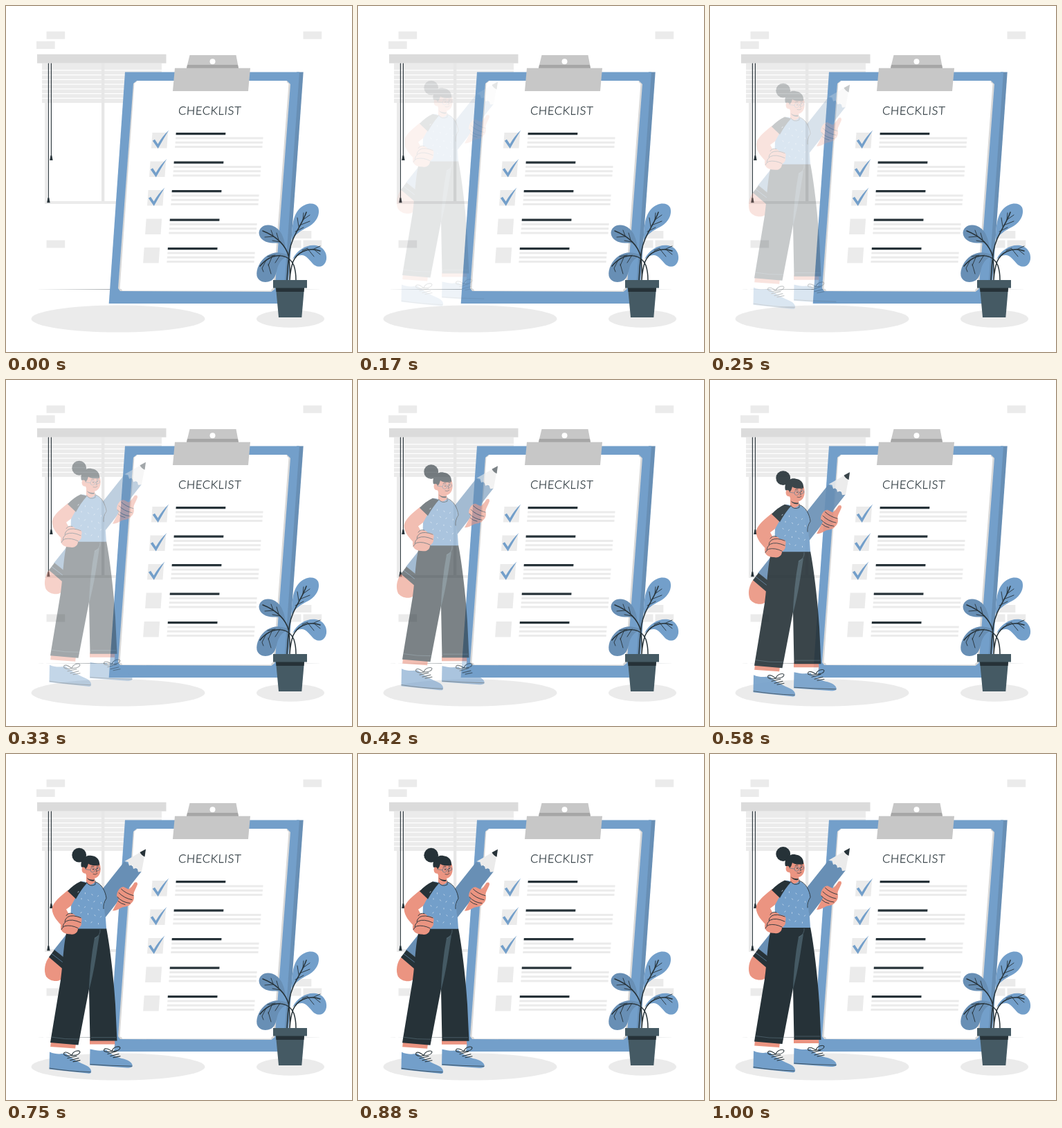
Write an HTML page that moves like this. It is 500x500 px and loops after 1.04 s.

```html
<!DOCTYPE html>
<html lang="en">
<head>
<meta charset="utf-8">
<title>Checklist</title>
<style>
html, body { margin: 0; width: 100%; height: 100%; overflow: hidden; background: #fff; }
svg { display: block; width: 100vw; height: 100vh; }
.blue { fill: #739fca; }
.shade { fill: #688fb5; }
.dark { fill: #263238; }
.slate { fill: #455a64; }
.pale { fill: #ebebeb; }
.grey { fill: #c7c7c7; }
.skin { fill: #eb9481; }
.white { fill: #fff; }
.line { fill: none; stroke: #263238; stroke-width: .9; stroke-linecap: round; stroke-linejoin: round; }
.thin { fill: none; stroke: #5d7580; stroke-width: .6; }
text { font: normal 300 16.4px Lato, "Open Sans", sans-serif; letter-spacing: .7px; fill: #263238; stroke: #263238; stroke-width: .25; }
</style>
</head>
<body>
<svg viewBox="0 0 500 500">
  <!-- wall -->
  <path class="pale" d="M58.5 36.700h26.700v11H58.500zM44 50.900h26.700v11H44zM429.500 36.700h26.700v11h-26.700zM58.500 338.500h26.700v11H58.500zM415 325h26.300v11H415zM400 338.500h26.500v11H400zM429.500 338.500h26.700v11h-26.700z"/>

  <!-- window -->
  <path class="pale" d="M56 83h4v199h165v4H56z"/>
  <path class="pale" d="M52 83h173v57H52z"/>
  <g id="slats"></g>
  <path fill="#e7e7e7" d="M138 83h4.300v199H138z"/>
  <path fill="#dbdbdb" d="M45 69.700h186.500v13H45z"/>
  <path class="line" style="stroke-width:1.100" d="M61.400 83V279M65.400 83V218"/>
  <path class="dark" d="M60.500 277h1.800l1.300 7.200h-4.400zM64.500 216h1.800l1.300 7h-4.400z"/>

  <!-- floor -->
  <path class="dark" d="M41 409.600L250 409.200 460 409.600 250 410z"/>
  <ellipse class="pale" cx="162" cy="452" rx="125.500" ry="19.500"/>
  <ellipse class="pale" cx="411" cy="452" rx="49" ry="12.700"/>

  <!-- clipboard -->
  <path class="shade" d="M420 95.500h9.700L406 430h-9z"/>
  <path class="blue" d="M172 95.500H424L400.500 430H148.700z"/>
  <path fill="#d9d9d9" d="M184 112l5-4H406l5 5L388.500 409l-5 4-218.500-1-3-4z"/>
  <path class="white" d="M185.500 111.500q3-.5 4-3.500H405.500q0 3 3 4L386 408q-3 1-3 3.500H168q0-2.500-3.500-3z"/>
  <path class="grey" d="M265.500 71H332.500L336 89.500H261z"/>
  <path fill="#a6a6a6" d="M262 85H335l1 5H261z"/>
  <circle class="white" cx="298.500" cy="80.300" r="4"/>
  <path class="grey" d="M244 89.700H353L350 123H241z"/>
  <text x="294.300" y="157.300" text-anchor="middle" transform="translate(11) skewX(-4)">CHECKLIST</text>
  <g id="rows"></g>

  <!-- plant -->
  <path class="blue" d="M413 339C413 322 414 303 424 293C433 284 446 283 451 291C455 302 447 314 437 319C425 325 418 330 413 339z"/>
  <path class="shade" d="M404 349C402 334 397 322 385 317.500C375 314 366 319 365.500 328C366 338 377 343 387 342.500C395 342 400 343 404 349z"/>
  <path class="blue" d="M414 366C421 352 435 344 448 346C459 348 464 357 463 366C461 377 452 379 445 374C439 368 434 360 427 360Q420 360 414 366z"/>
  <path class="shade" d="M411 362C400 355 388 354 377 361C367 368 361 380 362.500 390C365 399 375 401 383 397C392 392 390 380 395 372C399 365 404 362 411 362z"/>
  <path class="line" style="stroke-width:1.500" d="M434 298C428 316 413 332 409.500 355Q407 375 406 396M371 325C392 333 405 347 408.500 362Q411 380 410 396M454 354C434 347 420 358 415 369Q411 380 410 396M367 376C385 355 408 357 416 375Q419 384 419 396"/>
  <path class="line" d="M429 309l1-10M423 319l-2-13M429 309l10-7M424 317l15-6M418 326l12-6M386 332l-3-8M394 338l-3-10M387 333l-13 1M396 341l-11-2M436 351l9 11M444 351l10 8M428 353l8-3M445 351l9-4M385 361l-6 14M376 367l-6 12 2 5M389 360l-11 2M379 373l4 14M396 360l-7 11"/>
  <path class="slate" d="M390 407H431L427.300 450H394z"/>
  <path class="dark" d="M390 407H431L430.500 413H390.500z"/>
  <path class="slate" d="M386 396H435V407.500H386z"/>

  <g id="woman">
    <!-- pencil -->
    <path class="skin" d="M63 291C56 299 54 312 58 320C65 329 79 328 83 321L90 308z"/>
    <path class="shade" d="M171 154L196 168 93 299 69 282z"/>
    <path class="dark" d="M70 281.500L62 292 83 310 92 299z"/>
    <path class="thin" style="stroke:#739fca" d="M66 287l22 17"/>
    <path class="pale" d="M171.500 153.500L202 136 196 168.500 191 169 189.500 163 184 164.500 182.500 158.500 178 160 176.500 154.500z"/>
    <path class="dark" d="M202 136l-8.500 4.500q2 4 7 6.500z"/>

    <!-- raised hand -->
    <path class="skin" d="M154 225L163 208 160 204C160 197 165 190 170 190.500L177 194C181 192 183 188 185.500 184.500Q190 182 190 187C187 195 184 198 184.500 203C186 208 183 213 181 214C178 219 172 219 168 220C163 223 158 225 154 225z"/>
    <path class="line" d="M166.500 193.500Q173 200 184 203M163 199Q171 207 182 209M161 205Q168 213 179 214M162 211Q166 215 172 216"/>

    <!-- legs -->
    <path class="skin" d="M65 414L101 417 100 425 64 423zM121 411H157L157.500 420H121z"/>
    <path class="white" d="M64 421.500L100 424 98 437 63 433zM121 418H157L156 430H121z"/>
    <path class="blue" d="M63 429C72 433 80 432 86 431C92 436 98 440 106 444C114 448 122 450 123 456Q124 461 118 460L62.500 454z"/>
    <path class="blue" d="M121.500 425C130 427 138 428 145 426C152 433 160 437 170 439C178 441 184 446 182.500 450Q181 452 175 452L121 448z"/>
    <path class="line" style="stroke-width:.7" d="M63 452.500Q90 457 122 458M122 447Q150 449 182 449.500"/>
    <path class="line" style="stroke-width:1.100" d="M95 434C87 427 82 429 84 433Q88 436 95 434C97 427 106 426 107 429Q106 434 95 434M89 438l13-3M93 441l12-3M97 443l10-2M153 428C145 422 140 424 142 428Q146 430 153 428C155 421 164 420 165 423Q164 428 153 428M147 432l13-4M151 435l12-3M155 437l10-2"/>
    <path class="dark" d="M89 250H145C150 275 156 325 158 360L160.500 413H121.500L120 338 104.500 419 64 415.500 79 325C83 295 83 270 89 250z"/>
    <path class="slate" d="M128 264L135 260C131 285 128 310 120 340L119.500 347Q121 300 128 264z"/>
    <path class="thin" d="M66 407.500Q85 411 106 410.500M123 408H159M136 252Q137 260 128 265"/>

    <!-- body -->
    <path class="skin" d="M116 172V186Q122 192 129 186L128 176z"/>
    <path class="dark" d="M116.500 177Q121 181 128 180L127 182Q120 183 116.500 177z"/>
    <path class="skin" d="M90 195C80 203 68 212 66.500 222C67 233 75 241 83 249L92 232 87 223 95 217 105 206z"/>
    <path class="blue" d="M109 183Q114 182 117 185Q122 190 129 183.500C137 186 143 195 145 207Q140 217 144 236L145 251H101Q92 235 94 218L100 207z"/>
    <path class="dark" d="M89 196.500Q98 187 108 182.500L117 185Q108 195 101 208z"/>
    <path class="line" d="M116.500 184Q121 191 129 187V182M130 183.500C138 186 144 197 145 207Q140 215 141 222"/>
    <path id="specks" fill="none" stroke="#c9dbed" stroke-width=".9" stroke-linecap="round"/>

    <!-- hand on hip -->
    <path class="skin" d="M87 233C91 226 99 229 101 233C108 232 111 236 109 241C110 247 106 249 104 251C104 257 98 260 94 259C86 259 79 256 79 249C79 242 83 237 87 233z"/>
    <path class="line" d="M108 235Q96 230 89 234Q85 237 85 241M108 242Q95 236 87 240Q82 244 82 248M104 250Q94 245 85 247Q81 249 80 252M87 232Q90 227 96 229"/>

    <!-- head -->
    <circle class="dark" cx="105.700" cy="144.500" r="10.400"/>
    <path class="skin" d="M111 161C114 151 131 150 135.500 157C138 165 137 174 130 177.500C123 180 116 176 115 171C110 172 108 165 111 161z"/>
    <path class="dark" d="M109 162C106 151 116 143 124 145.500C131 146 136 152 135 159C128 160 123 160 119 157Q118 162 115 165Q114 161 111 162z"/>
    <path class="line" style="stroke-width:.7;stroke:#5f7689" d="M115 165l7 1"/>
    <circle class="line" style="stroke-width:.7;stroke:#5f7689" cx="125.300" cy="166" r="3.300"/>
    <circle class="line" style="stroke-width:.7;stroke:#5f7689" cx="133" cy="164.500" r="2.600"/>
    <path class="line" style="stroke-width:1.500" d="M126 165v.4M132 163.500v.4"/>
    <path class="line" style="stroke-width:.7" d="M123 161.500q2-1.500 4-.7M131 160.500l2.500-.3M130 165l1.500 3.500-1.500.3M126 172q3 1.500 6-1"/>
  </g>
</svg>
<script>
const el = id => document.getElementById(id);
const range = n => [...Array(n).keys()];

el('slats').innerHTML = range(7).map(i =>
  `<path class="white" d="M52 ${92.3 + i * 6.75}h173v1.300H52z"/>`).join('');

// A bar whose ends lean with the board
const bar = (x, y, w, h, kind) =>
  `<path class="${kind}" d="M${x} ${y}h${w}l${-h * .07} ${h}h${-w}z"/>`;

el('rows').innerHTML = range(5).map(i => {
  const tick = '<path class="blue" d="M211.800 194.700L215 192.800 219.500 199.500Q226 188 235.300 179.500Q227.500 192 219.700 206z"/>';
  return `<g transform="translate(${-2.95 * i} ${41.5 * i})">` +
    bar(211.5, 183, 22.5, 22.5, 'pale') + (i < 3 ? tick : '') +
    bar(245.7, 183, 71.7, 3.3, 'dark') +
    range(3).map(k => bar(245.3 - k * .5, 189.5 + k * 6.3, 126.3, 3, 'pale')).join('') + '</g>';
}).join('');

el('specks').setAttribute('d', range(20).map(i => {
  const row = i >> 2, x = 105 + i % 4 * 9.5 + row % 2 * 4, y = 197 + row * 10 + i % 4 * 2;
  return `M${x} ${y}l${i % 3 - 1} 1.300`;
}).join(''));

// cubic-bezier(.36, -.01, .5, 1.38)
const curve = (s, a, b) => 3 * (1 - s) ** 2 * s * a + 3 * (1 - s) * s * s * b + s ** 3;
function ease(x) {
  let lo = 0, hi = 1;
  for (let i = 0; i < 24; i++) {
    const mid = (lo + hi) / 2;
    if (curve(mid, .36, .5) < x) lo = mid; else hi = mid;
  }
  return curve(hi, -.01, 1.38);
}

// Poses change 24 times a second; LEAD covers times rounded to 10 ms
const LOOP = 1040, STEPS = 25, LEAD = 5;
const woman = el('woman');
function draw() {
  const step = Math.floor((performance.now() + LEAD) % LOOP / LOOP * STEPS);
  const p = ease(Math.min(1, step / (STEPS - 1) + .015));
  woman.setAttribute('opacity', step < 3 ? 0 : Math.min(1, p));
  woman.setAttribute('transform', `translate(0 ${30 * (p - 1)})`);
  requestAnimationFrame(draw);
}
draw();
</script>
</body>
</html>
```
